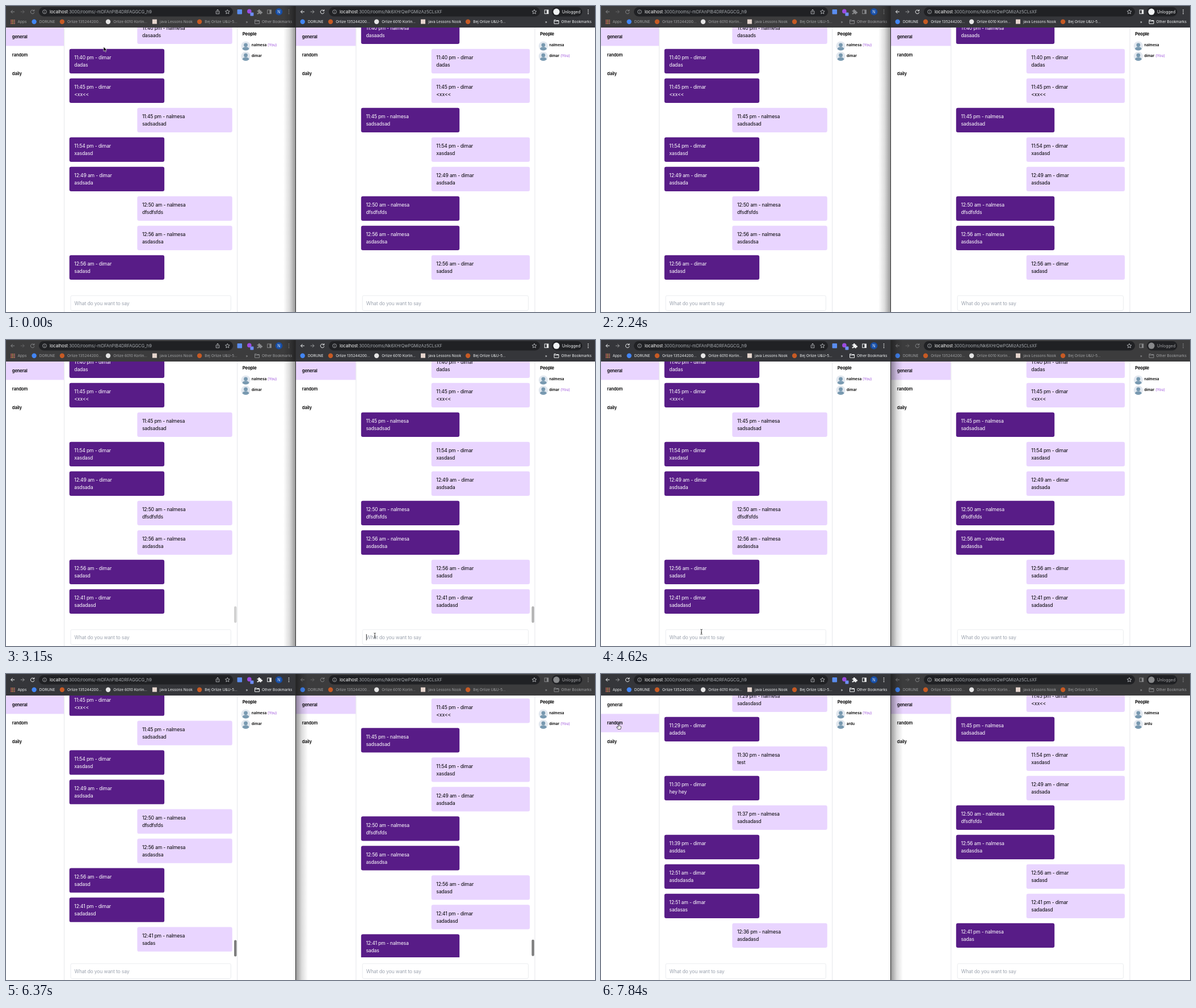
An HTML page for the animation above (8 s loop, 1038x540 px).

```html
<!DOCTYPE html>
<html lang="en">
<head>
<meta charset="utf-8">
<title>Chat rooms</title>
<style>
html, body { margin: 0; width: 100%; height: 100%; overflow: hidden; background: #fff; }
svg { display: block; width: 100vw; height: 100vh; }
text { font-family: Inter, Roboto, sans-serif; white-space: pre; }
.bar { --bg: #35363a; --ink: #f1f3f4; --label: #f1f3f4; }
.bar.idle { --bg: #3c3c3d; --ink: #87888a; --label: #a2a3a5; }
.fill { fill: var(--bg); }
.ink { fill: var(--ink); }
.line { fill: none; stroke: var(--ink); stroke-width: 1; }
.label { fill: var(--label); font-size: 6.5px; }
.url { fill: #a9adb2; font-size: 7.5px; }
.url tspan { fill: #fff; }
.body { font-size: 8.63px; letter-spacing: -.167px; }
.room { font-size: 7.55px; font-weight: 600; letter-spacing: -.08px; }
.head { font-size: 7.55px; font-weight: 700; letter-spacing: -.08px; }
.person { font-size: 6.5px; font-weight: 600; }
.you { font-size: 6.5px; font-weight: 500; fill: #ab6be0; }
.rule { stroke: #e5e7eb; stroke-width: 1; }
</style>
</head>
<body>
<script>
const LOOP = 8000, STEP = 70, LAST = 7840, PITCH = 52;
const DARK = '#581c87', LIGHT = '#e9d5ff', HINT = 'What do you want to say';
const ANN = 'nalmesa', BOB = 'dimar', CAL = 'ardu';

// The last two messages arrive during the loop
const general = [
  [ANN, '11:40 pm', 'dasaads'], [BOB, '11:40 pm', 'dadas'], [BOB, '11:45 pm', '<xx<<'],
  [ANN, '11:45 pm', 'sadsadsad'], [BOB, '11:54 pm', 'xasdasd'], [BOB, '12:49 am', 'asdsada'],
  [ANN, '12:50 am', 'dfsdfsfds'], [ANN, '12:56 am', 'asdasdsa'], [BOB, '12:56 am', 'sadasd'],
  [BOB, '12:41 pm', 'sadadasd'], [ANN, '12:41 pm', 'sadas']
];
const random = [
  [ANN, '11:29 pm', 'sadasdasd'], [BOB, '11:29 pm', 'adadds'], [ANN, '11:30 pm', 'test'],
  [BOB, '11:30 pm', 'hey hey'], [ANN, '11:37 pm', 'sadsadasd'], [BOB, '11:39 pm', 'asddas'],
  [BOB, '12:51 am', 'asdsdasda'], [BOB, '12:51 am', 'sadasas'], [ANN, '12:36 pm', 'asdadasd']
];

function add(parent, tag, attrs = {}, text) {
  const node = document.createElementNS('http://www.w3.org/2000/svg', tag);
  for (const k in attrs) node.setAttribute(k, attrs[k]);
  if (text !== undefined) node.textContent = text;
  parent.appendChild(node);
  return node;
}
const rect = (p, x, y, width, height, fill, more) => add(p, 'rect', { x, y, width, height, fill, ...more });
const dot = (p, cx, cy, r, fill) => add(p, 'circle', { cx, cy, r, fill });
const label = (p, cls, x, y, text, fill = '#000') => add(p, 'text', { class: cls, x, y, fill }, text);
const show = (node, on) => node.setAttribute('display', on ? 'inline' : 'none');
const clamp = v => Math.max(0, Math.min(1, v));
const smooth = v => (v = clamp(v)) * v * (3 - 2 * v);
const ramp = (t, a, b) => clamp((t - a) / (b - a));

const svg = add(document.body, 'svg', { viewBox: '0 0 1038 540', preserveAspectRatio: 'none' });
const defs = add(svg, 'defs');
rect(svg, 0, 0, 1038, 540, '#fff');

function messageList(parent, p, list) {
  const g = add(parent, 'g');
  list.forEach(([who, time, text], i) => {
    const mine = who === p.me, y = 23.7 + PITCH * i;
    const x = mine ? p.mineX : p.listX, ink = mine ? '#000' : '#fff';
    const item = add(g, 'g');
    rect(item, x, y, p.bubble, 43.3, mine ? LIGHT : DARK, { rx: 3.2 });
    label(item, 'body', x + 8.6, y + 18.4, `${time} - ${who}`, ink);
    label(item, 'body', x + 8.6, y + 31.4, text, ink);
  });
  return g;
}

function avatar(g, x, y) {
  dot(g, x, y, 8.2, '#e2e8ef');
  dot(g, x, y - 1.8, 3.4, '#7899b0');
  add(g, 'path', { d: `M${x - 6} ${y + 5.5}q.6-3.9 6-3.9t6 3.9q-6 5-12 0`, fill: '#7899b0' });
}

function page(p) {
  const g = add(svg, 'g');
  const tabs = [0, 1].map(i => rect(g, p.x, 38 + 32.4 * i, p.side - p.x, 32.4, LIGHT));
  ['general', 'random', 'daily'].forEach((s, i) => label(g, 'room', p.x + 10.8, 57 + 32.4 * i, s));
  for (const x of [p.side + .3, p.edge]) add(g, 'path', { class: 'rule', d: `M${x} 38V540` });

  const clip = add(defs, 'clipPath', { id: p.id });
  rect(clip, p.side, 38, p.edge - p.side, 462);
  const view = add(g, 'g', { 'clip-path': `url(#${p.id})` });
  const lists = [general, random].map(l => messageList(view, p, l));
  const thumb = rect(g, p.edge - 5.6, 468, 4.4, 29, '#7d7d7d', { rx: 2 });

  rect(g, p.input, 511, p.inputW, 26.5, '#fff', { rx: 2.5, stroke: '#e5e7eb', 'stroke-width': .8 });
  const field = label(g, 'body', p.input + 6.6, 527.6, HINT);
  const caret = rect(g, 0, 519, .8, 11, '#000');

  const px = p.edge + 9.2;
  label(g, 'head', px, 52.4, 'People');
  const names = [ANN, BOB].map((n, i) => {
    avatar(g, px + 5.7, 70.6 + 18.2 * i);
    return label(g, 'person', px + 16, 71.3 + 18.2 * i, n);
  });
  const you = p.me === ANN ? label(g, 'you', px + 44, 71.3, '(You)') : label(g, 'you', px + 36, 89.5, '(You)');
  return { ...p, tabs, lists, thumb, field, caret, names, you };
}

function arrow(g, x, dir) {
  add(g, 'path', { class: 'line', d: `M${x + 3.4 * dir} 10.2H${x - 3 * dir}m${3 * dir}-3l${-3 * dir} 3l${3 * dir} 3` });
}

function toolbar(x, width, o) {
  const g = add(svg, 'g', { class: 'bar' });
  rect(g, x, 0, width, 38, '', { class: 'fill' });
  arrow(g, x + o.nav, 1);
  arrow(add(g, 'g', { opacity: .5 }), x + o.nav + 17.5, -1);
  const rx = x + o.nav + 35;
  add(g, 'path', { class: 'line', d: `M${rx + 2.4} 8.1a3.3 3.3 0 1 0 .8 3M${rx + 3.2} 6.2v2.6h-2.6` });

  rect(g, o.pill, 2, o.pillW, 16.5, '#202124', { rx: 8.2 });
  add(g, 'circle', { cx: o.pill + 10, cy: 10.2, r: 3.4, fill: 'none', stroke: '#b5b8bc', 'stroke-width': .8 });
  add(g, 'path', { d: `M${o.pill + 10} 9.8v2.3m0-4.2v.9`, stroke: '#b5b8bc', 'stroke-width': .8 });
  const url = label(g, 'url', o.pill + 19, 13, '');
  add(url, 'tspan', {}, 'localhost');
  url.append(':3000/rooms/' + o.room);
  const star = Array.from({ length: 10 }, (_, i) => {
    const r = i % 2 ? 1.9 : 4.1, a = i * Math.PI / 5;
    return `${o.star + r * Math.sin(a)},${10.4 - r * Math.cos(a)}`;
  });
  add(g, 'polygon', { points: star.join(' '), fill: 'none', stroke: '#c9ccd0', 'stroke-width': .8 });

  rect(g, o.panel - 3.3, 7, 6.6, 6.6, 'none', { class: 'line' });
  rect(g, o.panel + .4, 7, 2.9, 6.6, '', { class: 'ink' });
  for (const y of [7.2, 10.3, 13.4]) add(g, 'circle', { class: 'ink', cx: o.menu, cy: y, r: .85 });

  const marks = [
    [0, 'DORUNE', '#4285f4'], [49.3, 'Orlize 135244200...', '#c65a24'],
    [130.4, 'Orlize 6010 Korlin...', '#e4e4e4'], [212.3, 'java Lessons Nook', '#e5d5cd'],
    [291.4, 'Bej Orlize U&U-5...', '#c65a24']
  ];
  marks.forEach(([dx, s, color], i) => {
    const cx = o.marks + dx;
    i === 3 ? rect(g, cx - 4, 23.6, 8, 8, color) : dot(g, cx, 27.7, 4.2, color);
    add(g, 'text', { class: 'label', x: cx + 9.2, y: 30 }, s);
  });
  add(g, 'text', { class: 'label', x: o.more, y: 30 }, '»');
  const fx = o.more + 16;
  add(g, 'path', { class: 'line', d: `M${fx} 24.6h3l1 1h4v5.6h-8zM${fx} 26.6h8` });
  add(g, 'text', { class: 'label', x: fx + 12.5, y: 30 }, 'Other Bookmarks');
  return g;
}

const left = page({
  id: 'a', x: 0, side: 102.3, edge: 407.6, listX: 111.7, mineX: 231.3, bubble: 167.4,
  input: 114, inputW: 282.3, me: ANN
});
const right = page({
  id: 'b', x: 511, side: 616.6, edge: 932, listX: 625.8, mineX: 749.7, bubble: 173.4,
  input: 628.2, inputW: 292.3, me: BOB
});

const barL = toolbar(0, 510, {
  nav: 11.7, pill: 58, pillW: 342, room: '-mDFAnPIB4DRFAGGCG_h9', star: 390.3,
  panel: 464, menu: 498.5, marks: 49.6, more: 422.5
});
const barR = toolbar(511, 527, {
  nav: 11.5, pill: 569, pillW: 372, room: 'Nk6XHrQwPGMizAz5CLsXF', star: 931,
  panel: 952.5, menu: 1026, marks: 522.7, more: 950
});

// Extra controls of the left bar
add(barL, 'path', { d: 'M371.6 9h-1.4v4.8h5.6V9h-1.4M373 11.6V6m-1.7 1.7L373 6l1.7 1.7', fill: 'none', stroke: '#c9ccd0', 'stroke-width': .8 });
rect(barL, 407.5, 6, 8.5, 8.5, '#5b8def', { rx: 1 });
dot(barL, 428.8, 9.4, 3.8, '#9b4be0');
rect(barL, 430.4, 11.6, 6, 6, '#6f8df5', { rx: 1 });
add(barL, 'path', { class: 'ink', d: 'M442.6 8h2.2a1.5 1.5 0 1 1 2.8 0h2.2v2.2a1.5 1.5 0 1 1 0 2.6V14.6h-2.2a1.4 1.4 0 1 0-2.8 0h-2.2v-2.4a1.4 1.4 0 1 0 0-2.4z' });
dot(barL, 481, 10.2, 6.2, '#174ea6');
add(barL, 'text', { x: 481, y: 12.7, fill: '#d6e2f5', 'font-size': 7, 'text-anchor': 'middle' }, 'N');
for (let i = 0; i < 9; i++) {
  rect(barL, 8.4 + i % 3 * 2.8, 24.3 + Math.floor(i / 3) * 2.8, 1.8, 1.8, ['#e8705f', '#d99a4e', '#c9776e'][i % 3]);
}
add(barL, 'text', { class: 'label', x: 20.6, y: 30 }, 'Apps');

// Private badge of the right bar
rect(barR, 962, 2, 53.5, 16.5, '#202124', { rx: 8.2 });
add(barR, 'circle', { class: 'ink', cx: 970, cy: 10.2, r: 5.6 });
add(barR, 'text', { class: 'label', x: 980, y: 12.6, style: 'font-size:7px' }, 'Unlogged');

function shadow(id, x, from, to) {
  const grad = add(defs, 'linearGradient', { id });
  [from, (from + to) / 3, to].forEach((o, i) => add(grad, 'stop', { offset: i / 2, 'stop-opacity': o }));
  return rect(svg, x, 0, 21, 540, `url(#${id})`);
}
const shadeL = shadow('sl', 489, 0, .4), shadeR = shadow('sr', 511, .4, 0);
rect(svg, 510, 0, 1, 540, '#2b2b2b');

const pointer = add(svg, 'g');
const shapes = {
  arrow: add(pointer, 'path', { d: 'M0 0V8L1.9 6.3 3.2 9.2 4.5 8.6 3.2 5.8H5.8Z', stroke: '#fff', 'stroke-width': .6 }),
  beam: add(pointer, 'path', { d: 'M-1.7-4.4Q0-4.4 0-3.2V3.2Q0 4.4-1.7 4.4M1.7-4.4Q0-4.4 0-3.2M0 3.2Q0 4.4 1.7 4.4M-1 .9H1', fill: 'none', stroke: '#111', 'stroke-width': .8 }),
  hand: add(pointer, 'path', { d: 'M-.8.3Q0-.6.8.3V3.4L3.7 4.2Q4.6 4.6 4.4 6L3.6 9.4H-1.2L-3.6 6Q-3.2 4.6-2.2 5.2L-.8 6.2Z', fill: '#fff', stroke: '#111', 'stroke-width': .7 })
};

// Pointer strokes: start, end, then start, control and end points
const strokes = [
  [0, 210, 172, 72, 330, 150, 478, 107],
  [280, 560, 478, 107, 690, 200, 812, 505],
  [560, 630, 812, 505, 760, 516, 710, 516],
  [770, 980, 710, 516, 690, 537, 645, 524],
  [3150, 3640, 650, 521.5, 450, 345, 168, 416],
  [3640, 3920, 168, 416, 172, 450, 177, 512],
  [4550, 4690, 177, 512, 177, 515, 177, 518],
  [5390, 5740, 177, 518, 300, 520, 486, 501],
  [6860, 7280, 486, 501, 150, 200, 3, 80],
  [7280, 7490, 3, 80, 10, 86, 31, 88]
];
const within = (t, ...spans) => spans.some(([a, b]) => t >= a && t < b);

function drawPointer(t) {
  show(pointer, !within(t, [1120, 3150], [4970, 5390], [6160, 6860]));
  const [a, b, x0, y0, cx, cy, x1, y1] = strokes.filter(s => s[0] <= t).pop();
  const u = smooth((t - a) / (b - a)), v = 1 - u;
  const x = v * v * x0 + 2 * u * v * cx + u * u * x1;
  const y = v * v * y0 + 2 * u * v * cy + u * u * y1;
  pointer.setAttribute('transform', `translate(${x} ${y})`);
  const inField = y > 511 && [left, right].some(p => x > p.input && x < p.input + p.inputW);
  const kind = inField ? 'beam' : x < 102 && y > 38 ? 'hand' : 'arrow';
  for (const k in shapes) show(shapes[k], k === kind);
}

// Letters typed by the given key times
const typed = (t, text, keys, sent) => t >= sent ? '' : text.slice(0, keys.filter(k => k <= t).length);

function drawField(p, text, caretOn) {
  p.field.textContent = text || HINT;
  p.field.setAttribute('fill', text ? '#000' : '#9ca3af');
  p.caret.setAttribute('x', p.input + 6.6 + (text ? p.field.getComputedTextLength() : 0));
  show(p.caret, caretOn);
}

// Each arrival adds a message, scrolls to it and fades the thumb out
function drawScroll(p, t, arrivals) {
  const items = p.lists[0].children, known = general.length - arrivals.length;
  let rows = 0, thumbY = 467, alpha = 0;
  arrivals.forEach(([begin, end, fade, gone], i) => {
    const k = smooth(ramp(t, begin, end)), here = t >= begin;
    show(items[known + i], here);
    rows += k;
    if (here) {
      thumbY = 467 + 3 * k;
      alpha = 1 - ramp(t, fade, gone);
    }
  });
  p.lists[0].setAttribute('transform', `translate(0 ${-PITCH * rows})`);
  p.thumb.setAttribute('y', thumbY);
  p.thumb.setAttribute('opacity', alpha);
}

function draw(now) {
  const t = Math.min(LAST, Math.floor(now % LOOP / STEP) * STEP);
  const leftActive = t >= 4060;
  barL.setAttribute('class', leftActive ? 'bar' : 'bar idle');
  barR.setAttribute('class', leftActive ? 'bar idle' : 'bar');
  const swap = ramp(t, 3990, 4200);
  shadeL.setAttribute('opacity', 1 - swap);
  shadeR.setAttribute('opacity', swap);

  drawScroll(left, t, [[2255, 2467, 2970, 3250], [6200, 6420, 6930, 7210]]);
  drawScroll(right, t, [[2270, 2490, 3010, 3350], [6230, 6470, 6970, 7310]]);

  drawField(right, typed(t, 'sadadasd', [1330, 1400, 1400, 1540, 1610, 1750, 1750, 1820], 2240),
    within(t, [1260, 2240], [2870, 3360], [3850, 4060]));
  drawField(left, typed(t, 'sadas', [4970, 5040, 5040, 5180, 5250], 6160),
    within(t, [4690, 5740], [6860, 7350]));

  const moved = t >= 7560;
  show(left.tabs[0], !moved);
  show(left.tabs[1], moved);
  show(right.tabs[1], false);
  show(left.lists[0], !moved);
  show(left.lists[1], t >= 7630);
  show(right.lists[1], false);
  for (const p of [left, right]) p.names[1].textContent = t >= 7770 ? CAL : BOB;
  show(right.you, t < 7770);
  drawPointer(t);
}

const start = performance.now();
function tick() {
  draw(performance.now() - start);
  requestAnimationFrame(tick);
}
tick();
</script>
</body>
</html>
```
